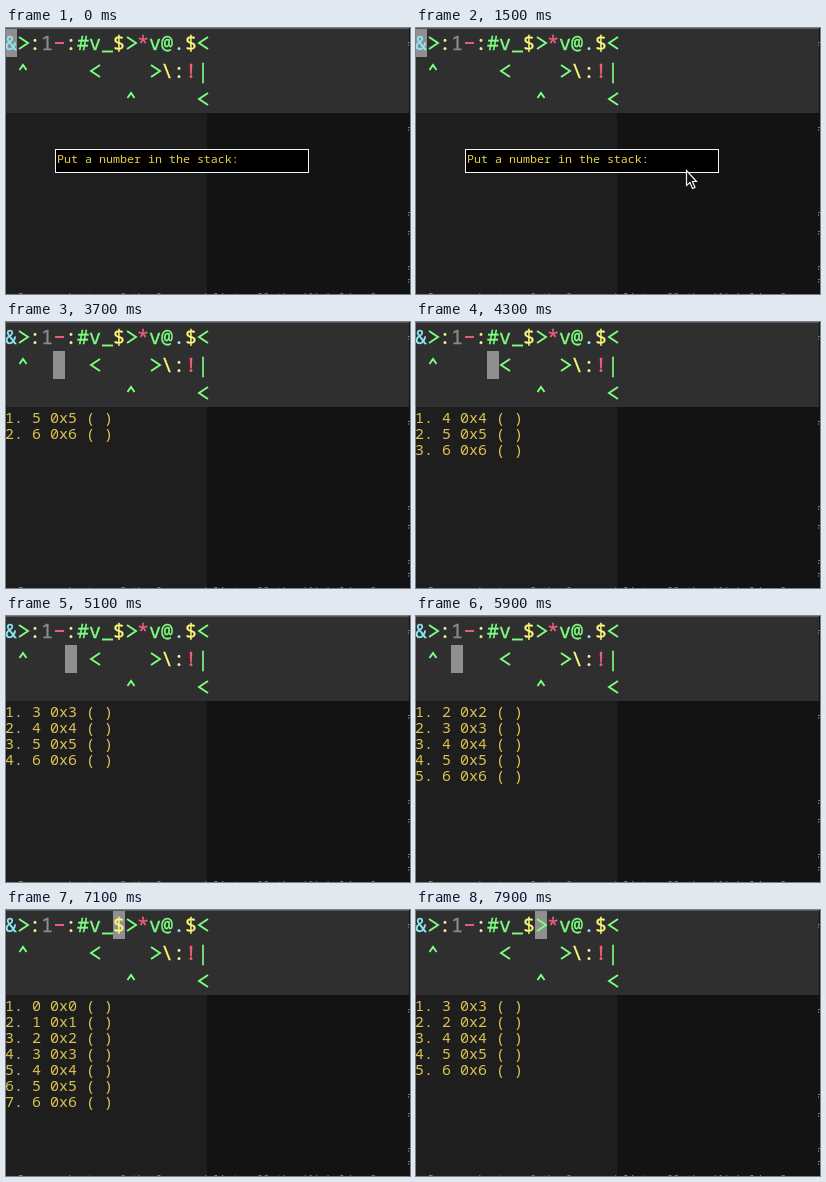
Write an HTML page with a canvas that moves like this. It is 404 px wide and 266 px high and loops after 8000 ms.

```html
<!DOCTYPE html>
<html lang="en">
<head>
<meta charset="utf-8">
<title>Stack program</title>
<style>
html, body { margin: 0; width: 100%; height: 100%; overflow: hidden; background: #131313; }
canvas { display: block; }
</style>
</head>
<body>
<canvas id="stage" width="404" height="266"></canvas>
<script>
const ctx = document.getElementById('stage').getContext('2d');
const LOOP = 8000, TICK = 100, STEP = 48, RUN_AT = 3140, TYPE_AT = 2900;
const MONO = '"Noto Sans Mono", "DejaVu Sans Mono", monospace';
const program = [
  '&>:1-:#v_$>*v@.$<',
  ' ^     <    >\\:!|',
  '          ^     <'
];
const palette = [
  ['&.', '#8eeaf6'], [':', '#f0f0a0'], ['$\\', '#fffc78'],
  ['-*!', '#f0607a'], ['1', '#8b8b8b']
];

// Line glyphs, as points from the left end of the baseline.
const strokes = {
  '<': [[11, -13], [2, -7], [11, -1]],
  '>': [[2, -13], [11, -7], [2, -1]],
  '^': [[2.5, -8], [6, -13], [9.5, -8]],
  '-': [[2, -7], [11, -7]],
  '_': [[1, 1.5], [12, 1.5]]
};

function colorOf(ch) {
  const hit = palette.find(([set]) => set.includes(ch));
  return hit ? hit[1] : '#7dff80';
}

// Run the program once, keeping the position and stack before every step.
function trace(input, count) {
  const log = [], stack = [];
  const pop = () => stack.length ? stack.pop() : 0;
  let x = 0, y = 0, dx = 1, dy = 0;
  const turn = (a, b) => { dx = a; dy = b; };
  const ops = {
    '&': () => stack.push(input),
    '1': () => stack.push(1),
    ':': () => { const a = pop(); stack.push(a, a); },
    '-': () => { const b = pop(); stack.push(pop() - b); },
    '*': () => stack.push(pop() * pop()),
    '\\': () => { const b = pop(), a = pop(); stack.push(b, a); },
    '!': () => stack.push(pop() ? 0 : 1),
    '$': pop,
    '.': pop,
    '>': () => turn(1, 0),
    '<': () => turn(-1, 0),
    '^': () => turn(0, -1),
    'v': () => turn(0, 1),
    '_': () => turn(pop() ? -1 : 1, 0),
    '|': () => turn(0, pop() ? -1 : 1),
    '#': () => { x += dx; y += dy; }
  };
  while (log.length < count) {
    log.push({ x, y, stack: stack.slice().reverse() });
    const op = ops[program[y][x]];
    if (op) op();
    x += dx;
    y += dy;
  }
  return log;
}

const states = trace(6, 105);

function box(x, y, w, h, color) {
  ctx.fillStyle = color;
  ctx.fillRect(x, y, w, h);
}

function text(str, x, y, size, color) {
  ctx.font = size + 'px ' + MONO;
  ctx.fillStyle = color;
  ctx.fillText(str, x, y);
}

function path(points) {
  ctx.beginPath();
  for (const [x, y] of points) ctx.lineTo(x, y);
}

function glyph(ch, x, y) {
  const color = ctx.strokeStyle = colorOf(ch);
  if (!strokes[ch]) {
    text(ch, x, y, 20, color);
    ctx.lineWidth = 0.3;
    ctx.strokeText(ch, x, y);
    return;
  }
  ctx.lineWidth = 1.9;
  path(strokes[ch].map(([px, py]) => [x + px, y + py]));
  ctx.stroke();
}

function drawPanels() {
  box(0, 0, 404, 266, '#131313');
  box(0, 0, 403, 85, '#2f2f2f');
  box(0, 0, 403, 1, '#585858');
  box(0, 85, 201, 181, '#1e1e1e');
  text('Runs each step of the loop and lists all the (1) held values', 12, 273, 10.5, '#8a8a8a');
  for (const y of [14, 99, 184, 203, 238, 251]) {
    box(402, y, 2, 1, '#777');
    box(402, y + 2, 1, 2, '#666');
  }
}

function drawProgram(state) {
  box(state.x * 12 - 1, state.y * 28 + 1, 12, 28, '#8f8f8f');
  program.forEach((row, y) => [...row].forEach((ch, x) => {
    if (ch !== ' ') glyph(ch, x * 12 - 1, 22 + y * 28);
  }));
}

function drawStack(stack) {
  stack.forEach((n, i) => {
    const ch = n > 31 ? String.fromCharCode(n) : ' ';
    text(`${i + 1}. ${n} 0x${n.toString(16)} (${ch})`, -1, 101 + i * 16, 15, '#dcc250');
  });
}

function drawPrompt(typed) {
  box(49, 121, 254, 24, '#f4f4f4');
  box(50, 122, 252, 22, '#000');
  text('Put a number in the stack:' + (typed ? '  6' : ''), 51, 135, 11.667, '#e9d04a');
}

function drawPointer(t) {
  if (t < 1200 || t >= 2700) return;
  const ease = k => k * k * (3 - 2 * k);
  const away = t < 1500 ? ease((1500 - t) / 400)
    : t > 2100 ? ease((t - 2100) / 600) : 0;
  ctx.save();
  ctx.translate(270.5 + 70 * away, 142.5 + 124 * away);
  path([[0, 0], [0, 15], [3.5, 12], [6, 18], [8.5, 17], [6, 11], [10, 11]]);
  ctx.closePath();
  ctx.fillStyle = '#111';
  ctx.fill();
  ctx.strokeStyle = '#f2f2f2';
  ctx.lineWidth = 1.2;
  ctx.stroke();
  ctx.restore();
}

function draw(now) {
  const t = Math.floor((now % LOOP) / TICK) * TICK;
  const running = t >= RUN_AT;
  const state = states[running ? Math.floor((t - RUN_AT) / STEP) + 1 : 0];
  drawPanels();
  drawProgram(state);
  if (running) drawStack(state.stack);
  else drawPrompt(t >= TYPE_AT);
  drawPointer(t);
}

let start;
function frame(now) {
  if (start === undefined) start = now;
  draw(Math.max(0, now - start));
  requestAnimationFrame(frame);
}
draw(0);
requestAnimationFrame(frame);
</script>
</body>
</html>
```
